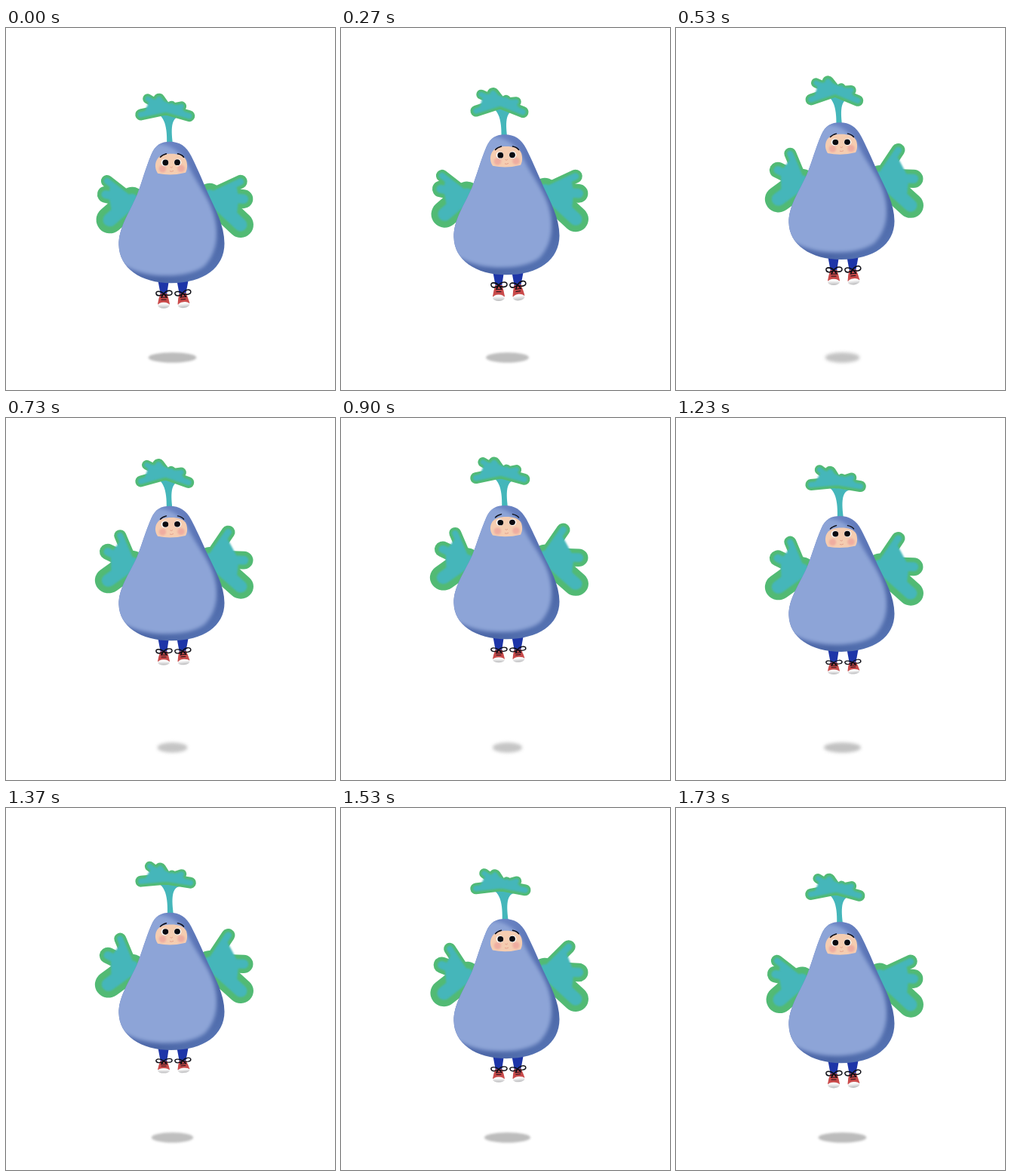
An HTML page that plays this animation: 436x480 px, repeating every 1760 ms.

```html
<!DOCTYPE html>
<html lang="en">
<head>
<meta charset="utf-8">
<title>Floating pear bird</title>
<style>
  html, body { margin: 0; width: 100%; height: 100%; overflow: hidden; background: #fff; }
  svg { display: block; width: 100vw; height: 100vh; }
  .rim { stroke: #52ba74; stroke-linecap: round; }
  .core { fill: #44b6ba; stroke: #44b6ba; stroke-linecap: round; stroke-linejoin: round; filter: url(#soft); }
  .ink { fill: none; stroke: #0c0c14; stroke-width: 1.5; stroke-linecap: round; }
  .thin { stroke-width: .9; }
</style>
</head>
<body>
<svg viewBox="0 0 436 480">
  <defs>
    <filter id="soft" filterUnits="userSpaceOnUse" x="0" y="0" width="436" height="480"><feGaussianBlur stdDeviation="1.3"/></filter>
    <filter id="shade" filterUnits="userSpaceOnUse" x="0" y="0" width="436" height="480"><feGaussianBlur stdDeviation="2.6"/></filter>
    <filter id="haze" filterUnits="userSpaceOnUse" x="150" y="410" width="140" height="60"><feGaussianBlur id="hazeBlur"/></filter>
    <linearGradient id="dark" x1=".2" y1="0" x2=".8" y2="1">
      <stop offset="0" stop-color="#7089c8"/>
      <stop offset=".45" stop-color="#5872b4"/>
      <stop offset=".8" stop-color="#4b66a6"/>
      <stop offset="1" stop-color="#5674b4"/>
    </linearGradient>
    <linearGradient id="toe" x1="0" y1="0" x2="0" y2="1">
      <stop offset=".3" stop-color="#fafafa"/>
      <stop offset="1" stop-color="#b9b9bb"/>
    </linearGradient>
    <path id="pear" d="M217 151C206 151 198 155 192.500 168C185 186 180 205 173.500 222C162.500 247 149 266 149.500 288C150 318 178 338.500 219 338.500C262 338.500 289.500 318 289.500 286C289.500 262 277 240 267.500 219C259 199 252 183 245.500 170C239 157 230 151 217 151Z"/>
    <clipPath id="pearClip"><use href="#pear"/></clipPath>
    <g id="shoe">
      <path d="M-4.500 0H4.500Q7 8 8 14Q0 18-8 14Q-7 7-4.500 0Z" fill="#c94a4a"/>
      <ellipse cy="15.500" rx="7.800" ry="4" fill="url(#toe)"/>
      <path class="ink thin" d="M-3 5H3M-3 8H3"/>
      <path class="ink" d="M0 0C-4-4-11-4-10 0S-3 3 0 0C4-5 11-5 11-1S3 3 0 0L-3 5M0 0L4 5"/>
    </g>
  </defs>

  <ellipse id="shadow" cx="220.500" cy="437" ry="6.800" fill="#bcbcbc" filter="url(#haze)"/>

  <g id="wings"></g>

  <g id="legs">
    <path d="M200 326H217L213 353H205ZM225 326H243L238 353H230Z" fill="#1d35a8"/>
    <g id="shoes">
      <use href="#shoe" x="209" y="351"/>
      <use href="#shoe" transform="translate(234 350.500) rotate(-6)"/>
    </g>
  </g>

  <g id="plume">
    <path d="M213 160C214 138 213 116 196 112L230 118C217 119 219 140 222 160Z" fill="#44b6ba"/>
  </g>

  <g id="body">
    <use href="#pear" fill="url(#dark)"/>
    <g clip-path="url(#pearClip)">
      <path d="M130 290L188 156C206 150 230 157 242 184C253 206 268 224 275 246C284 276 278 300 263 316C243 332 190 334 160 317L130 310Z" fill="#8da4d7" filter="url(#shade)"/>
    </g>
    <path d="M199 177C202 169 210 167 219 167S236 169 239 176C241 183 240 188 238 192Q219 197 201 193C198 188 197 183 199 177Z" fill="#f5cdb1"/>
    <g fill="#efada0" filter="url(#soft)"><circle cx="207.500" cy="187" r="4.800"/><circle cx="232" cy="186.500" r="4.800"/></g>
    <path d="M217.500 184.500Q219.500 186.500 221 184M217 190Q219.500 191.300 222 189.500" fill="none" stroke="#e39a86" stroke-width=".9"/>
    <g id="gaze">
      <g fill="#fff"><circle cx="210.500" cy="178.700" r="4.800"/><circle cx="227.500" cy="178.400" r="4.800"/></g>
      <g fill="#0a0a10"><circle cx="211.300" cy="178.700" r="3.900"/><circle cx="227" cy="178.400" r="3.900"/></g>
      <path class="ink" d="M204.500 171.500Q207 168.500 212.500 167M227.500 167Q233 168 235.500 171.500"/>
    </g>
  </g>
</svg>

<script>
const LOOP = 1760, TOP = 151, HEIGHT = 187, KNEE = 353;
const $ = q => document.querySelector(q);

function add(parent, tag, attrs) {
  const el = document.createElementNS('http://www.w3.org/2000/svg', tag);
  return parent.appendChild(set(el, attrs));
}

function set(el, attrs) {
  for (const key in attrs) el.setAttribute(key, attrs[key]);
  return el;
}

// Round petals spread from a hub, green outside and teal inside.
// Each petal is [angle, swing, length, radius]; side -1 mirrors the fan.
function fan(parent, x, y, side, petals) {
  const rims = petals.map(p => add(parent, 'path', { class: 'rim', 'stroke-width': 2 * p[3] }));
  const core = add(parent, 'g', { class: 'core' });
  const veins = petals.map(p => add(core, 'path', { 'stroke-width': p[3] }));
  const palm = add(core, 'path', { 'stroke-width': 5 });

  return pose => {
    const tips = petals.map(([angle, swing, length]) => {
      const a = (angle - swing * pose) * Math.PI / 180;
      return [side * length * Math.cos(a), length * Math.sin(a)];
    });
    const at = ([dx, dy], k) => `L${x + dx * k} ${y + dy * k}`;
    const start = `M${x} ${y}`;
    tips.forEach((tip, i) => [rims[i], veins[i]].forEach(el => set(el, { d: start + at(tip, 1) })));
    set(palm, { d: start + tips.map(tip => at(tip, .8)).join('') + 'Z' });
  };
}

const leftWing = fan($('#wings'), 167, TOP + 78, -1, [[-38, 30, 42, 8], [-13, 14, 36, 11], [41, 4, 39, 18]]);
const rightWing = fan($('#wings'), 270, TOP + 72, 1, [[-25, 32, 45, 9], [5, 3, 45, 12.5], [43, 0, 56, 17]]);
const plume = fan($('#plume'), 212, TOP - 43, 1,
  [[168, 7, 34, 7.5], [210, 7, 28, 6.5], [235, 3, 16, 8], [-35, -3, 9, 6], [-11, -7, 21, 6.5], [16, -7, 32, 7.5]]);

function smooth(t, from, to) {
  const u = Math.min(1, Math.max(0, (t - from) / (to - from)));
  return u * u * (3 - 2 * u);
}

function draw(t) {
  const phase = 2 * Math.PI * t / LOOP;
  const wave = lead => (1 - Math.cos(phase + lead)) / 2;
  const height = wave(.14);
  const drag = Math.sin(phase);
  const lift = 35.5 * height;
  const stretch = 1 - .055 * wave(-.2);
  const flap = smooth(t, 290, 520) - smooth(t, 1400, 1720);

  const move = (id, transform) => set($(id), { transform });
  const squash = `translate(0 ${TOP - lift}) scale(1 ${stretch}) translate(0 ${-TOP})`;
  move('#body', squash);
  move('#wings', `translate(0 ${3.5 * drag}) ${squash}`);
  move('#plume', `translate(${-.8 * drag} ${1.8 * drag - lift})`);
  move('#legs', `translate(0 ${HEIGHT * (stretch - 1) - lift + 1.5})`);
  move('#shoes', `translate(0 ${KNEE}) scale(1 ${1 - .13 * height + .13 * drag}) translate(0 ${-KNEE})`);
  move('#gaze', `translate(0 ${-4 * wave(-.5) ** 2})`);

  leftWing(flap);
  rightWing(flap);
  plume(drag);

  set($('#shadow'), { rx: 32 - 12.5 * height, opacity: 1 - .15 * height });
  set($('#hazeBlur'), { stdDeviation: 1.4 + height });
}

function tick(now) {
  draw(now % LOOP);
  requestAnimationFrame(tick);
}
draw(0);
requestAnimationFrame(tick);
</script>
</body>
</html>
```
